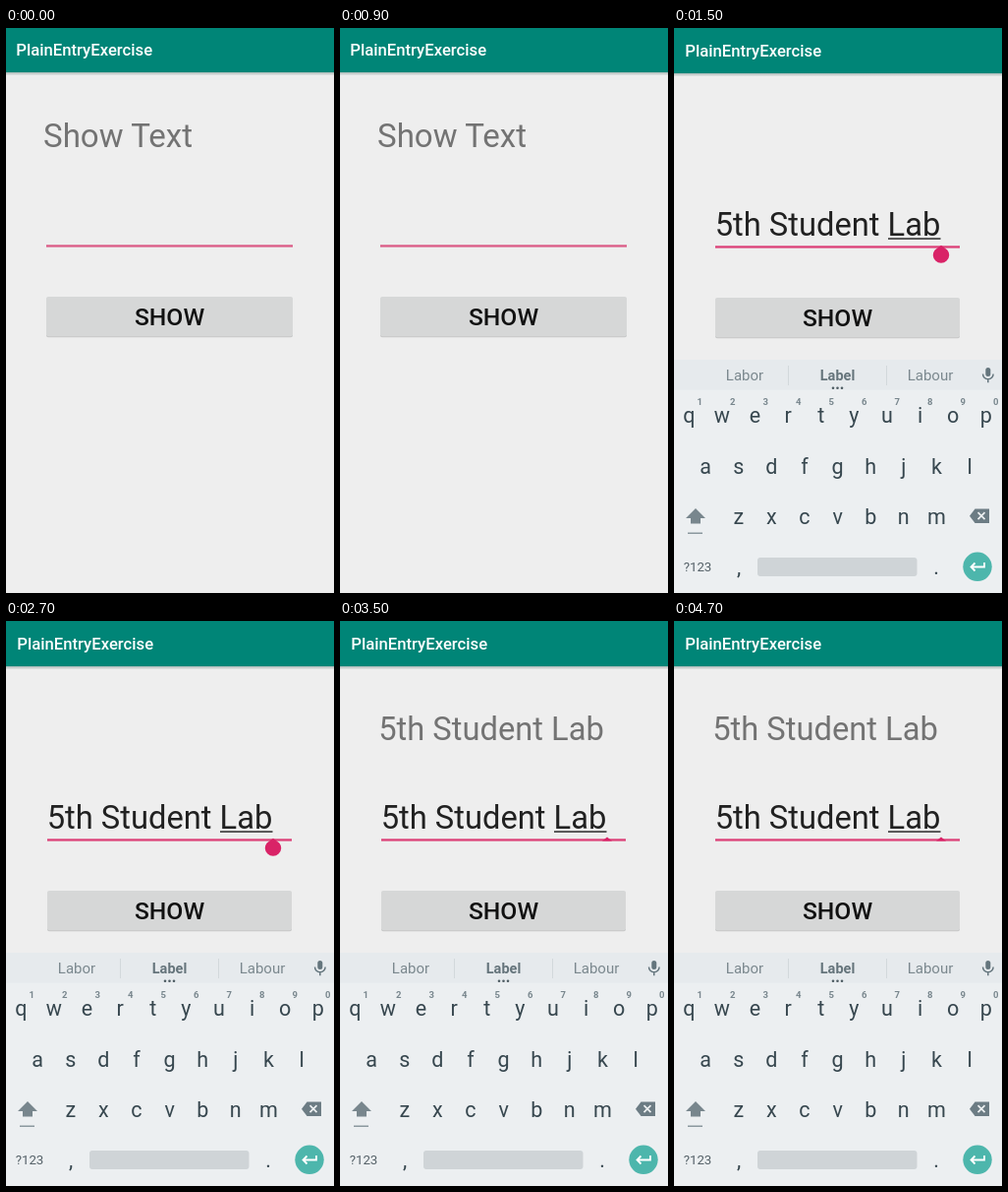
An HTML page that plays this animation: 334 by 574 pixels, repeating every 5.5 s.

```html
<!DOCTYPE html>
<html lang="en">
<head>
<meta charset="utf-8">
<title>Text entry demo</title>
<style>
  html, body { margin: 0; width: 100%; height: 100%; overflow: hidden; background: #eee; }
  svg { display: block; width: 334px; height: 574px; font-family: Roboto, sans-serif; }
  .title { font-size: 16.7px; font-weight: 500; fill: #fff; }
  .big { font-size: 32.7px; }
  .label { fill: #737373; }
  .input { fill: #212121; }
  .button { font-size: 24.7px; font-weight: 500; fill: #111; text-anchor: middle; }
  .key { font-size: 21.5px; fill: #37474f; text-anchor: middle; }
  .digit { font-size: 9.5px; font-weight: 700; fill: #78868d; text-anchor: middle; }
  .hint { font-size: 15px; fill: #7b888e; text-anchor: middle; }
  .hint.best { font-size: 14.5px; font-weight: 700; fill: #65747b; }
  .mode { font-size: 13.3px; fill: #546067; text-anchor: middle; }
</style>
</head>
<body>
<svg viewBox="0 0 334 574">
  <defs>
    <linearGradient id="shade" x2="0" y2="1">
      <stop stop-color="#aab8b6"/>
      <stop offset="1" stop-color="#eee"/>
    </linearGradient>
  </defs>
  <rect width="334" height="574" fill="#eee"/>

  <g id="idle"></g>
  <g id="typing"></g>
  <path id="handle" d="M272 220.8L278.3 225.4A8.2 8.2 0 1 1 265.7 225.4Z" fill="#d92367"/>
  <g id="result">
    <text class="big label" x="39.2" y="120.9">5th Student Lab</text>
    <path d="M272 219.5l5 4h-10z" fill="#d92367"/>
  </g>
</svg>
<script>
const LOOP = 5500, TYPED = 1500, SHOWN = 3500;
const NS = 'http://www.w3.org/2000/svg';
const $ = id => document.getElementById(id);

function add(parent, tag, attrs, content = '') {
  const el = document.createElementNS(NS, tag);
  for (const name in attrs) el.setAttribute(name, attrs[name]);
  el.textContent = content;
  parent.append(el);
  return el;
}
const text = (g, cls, x, y, s) => add(g, 'text', { class: cls, x, y }, s);
const box = (g, x, y, width, height, fill, rx = 0) =>
  add(g, 'rect', { x, y, width, height, fill, rx });
const path = (g, d, fill, stroke = 'none', width = 0) =>
  add(g, 'path', { d, fill, stroke, 'stroke-width': width });

// Header, input line and button; x and y are the button's corner.
function form(g, x, y, width, pink) {
  const headerHeight = y - 228;
  box(g, 0, headerHeight, 334, 3.5, 'url(#shade)');
  box(g, 0, 0, 334, headerHeight, '#008577');
  text(g, 'title', x - 30.7, y - 244.6, 'PlainEntryExercise');
  box(g, x, y - 52.7, width, 2.3, pink);
  box(g, x, y + 1, width, 40.3, '#c6c7c7', 2);
  box(g, x, y, width, 40.3, '#d6d7d7', 2);
  text(g, 'button', 166.5, y + 29, 'SHOW');
}

function keyRow(g, keys, x, y) {
  [...keys].forEach((k, i) => text(g, 'key', x + i * 33.6, y, k));
}

function keyboard(g) {
  box(g, 0, 337, 334, 237, '#eceff1');
  box(g, 0, 337, 334, 30.5, '#e6eaed');

  text(g, 'hint', 72, 358, 'Labor');
  text(g, 'hint best', 166.5, 358, 'Label');
  text(g, 'hint', 261, 358, 'Labour');
  for (const x of [116, 216]) box(g, x, 343, 1, 20, '#d2d8db');
  for (const x of [162, 166.5, 171]) add(g, 'circle', { cx: x, cy: 365.7, r: 1.3, fill: '#4c5a61' });

  box(g, 317.3, 345, 5, 9, '#64757d', 2.5);
  path(g, 'M314.5 351.5a5.3 5.3 0 0 0 10.6 0M319.8 356.8v3.4', 'none', '#64757d', 1.5);

  keyRow(g, 'qwertyuiop', 15.3, 401);
  keyRow(g, 'asdfghjkl', 32.2, 452.5);
  keyRow(g, 'zxcvbnm', 65.8, 503.7);
  [...'1234567890'].forEach((d, i) => text(g, 'digit', 26.3 + i * 33.5, 382.5, d));

  path(g, 'M22 488l10 10h-5v5.5h-10v-5.5h-5z', '#78868d');
  box(g, 14, 512.5, 15, 1.5, '#8b989e');
  path(g, 'M306.5 488.5h14.5v14.5h-14.5l-5.5-7.25z', '#6c7c84');
  path(g, 'M309.5 492.2l7 7m0-7l-7 7', 'none', '#eceff1', 1.7);

  text(g, 'mode', 24, 552, '?123');
  text(g, 'key', 66, 554.5, ',');
  box(g, 85, 538, 162.5, 19, '#cfd4d7', 3);
  text(g, 'key', 267, 554.5, '.');
  add(g, 'circle', { cx: 309, cy: 547.3, r: 14.7, fill: '#4db6ac' });
  path(g, 'M316 543v4.5h-13.5m4-4l-4 4 4 4', 'none', '#fff', 1.8);
}

form($('idle'), 41, 273, 251, '#db5c87');
text($('idle'), 'big label', 38, 120.8, 'Show Text').style.fontSize = '33.1px';

form($('typing'), 42, 274, 249, '#dc4178');
text($('typing'), 'big input', 41.7, 210.8, '5th Student Lab');
box($('typing'), 218, 213.3, 53.5, 1.5, '#2a2a2a');
keyboard($('typing'));

// Hard cuts: each part is visible only between two times of the loop.
function showBetween(id, from, to) {
  const steps = [
    { offset: 0, opacity: from === 0 ? 1 : 0 },
    { offset: from / LOOP, opacity: 1 },
    { offset: to / LOOP, opacity: to === LOOP ? 1 : 0 },
    { offset: 1, opacity: to === LOOP ? 1 : 0 }
  ].map(step => ({ ...step, easing: 'step-end' }));
  $(id).animate(steps, { duration: LOOP, iterations: Infinity });
}

showBetween('idle', 0, TYPED);
showBetween('typing', TYPED, LOOP);
showBetween('handle', TYPED, SHOWN);
showBetween('result', SHOWN, LOOP);
</script>
</body>
</html>
```
